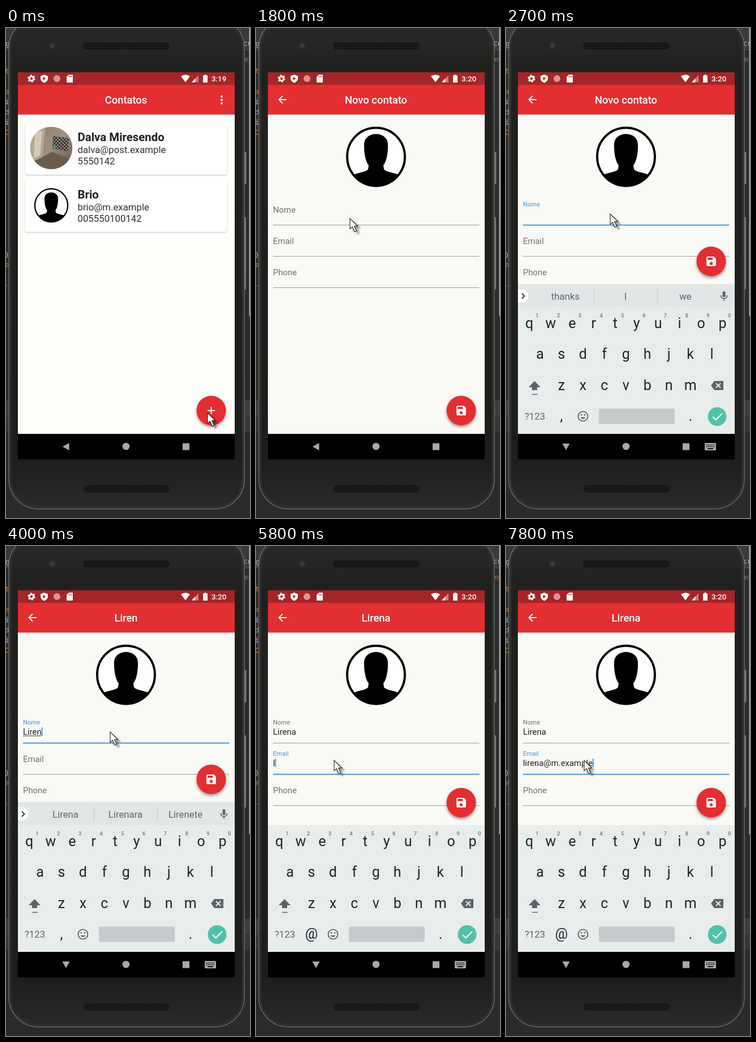
These frames come from a looping animation (431x862 px, 8000 ms). An HTML page:

```html
<!DOCTYPE html>
<html lang="pt">
<head>
<meta charset="utf-8">
<title>Contatos</title>
<style>
html, body { margin: 0; width: 100%; height: 100%; overflow: hidden; background: #2b2b2b; }
svg { display: block; width: 100vw; height: 100vh; font-family: Roboto, sans-serif; }
.title { font-size: 18.4px; font-weight: 500; fill: #fff; text-anchor: middle; }
.code { font: 13px "DejaVu Sans Mono", monospace; fill: #a9b7c6; }
.key { font-size: 25px; fill: #17262d; text-anchor: middle; }
.digit { font-size: 9.5px; font-weight: 500; fill: #6c777c; text-anchor: middle; }
.word { font-size: 16.8px; fill: #5b666b; text-anchor: middle; }
.name { font-size: 20.4px; font-weight: 700; fill: #212121; }
.info { font-size: 16.8px; fill: #303030; }
.entry { font-size: 14.9px; fill: #222; }
</style>
</head>
<body>
<svg viewBox="0 0 431 862" preserveAspectRatio="none">
<defs>
  <linearGradient id="body" x2="0" y2="1">
    <stop offset="0" stop-color="#2b2c29"/><stop offset=".1" stop-color="#20211e"/>
    <stop offset=".9" stop-color="#1d1e1b"/><stop offset="1" stop-color="#2a2b28"/>
  </linearGradient>
  <linearGradient id="room" x2="1" y2="1">
    <stop offset="0" stop-color="#8e8272"/><stop offset=".5" stop-color="#a08f7b"/><stop offset="1" stop-color="#5d5144"/>
  </linearGradient>
  <pattern id="mesh" width="3" height="3" patternUnits="userSpaceOnUse">
    <rect width="3" height="3" fill="#10110f"/><circle cx="1.5" cy="1.5" r=".8" fill="#343532"/>
  </pattern>
  <pattern id="check" width="6" height="6" patternUnits="userSpaceOnUse">
    <rect width="6" height="6" fill="#2d2b2a"/><path d="M0 0h3v6h3v-3h-6z" fill="#8c8983"/>
  </pattern>
  <filter id="soft" x="-50%" y="-50%" width="200%" height="200%">
    <feDropShadow dx="0" dy="3" stdDeviation="2.5" flood-opacity=".4"/>
  </filter>
  <filter id="edge" x="-5%" y="-10%" width="110%" height="125%">
    <feDropShadow dx="0" dy="1" stdDeviation="1" flood-opacity=".28"/>
  </filter>
  <filter id="tipShade" x="-50%" y="-50%" width="250%" height="250%">
    <feDropShadow dx="5" dy="4" stdDeviation="1.4" flood-opacity=".35"/>
  </filter>
  <clipPath id="photo"><circle cx="80" cy="211" r="37.3"/></clipPath>
  <clipPath id="screen"><rect x="21" y="78" width="383" height="636"/></clipPath>
  <g id="person">
    <circle r="51" fill="#fff" stroke="#000" stroke-width="4"/>
    <path d="M-21-18C-22-33-12-40 0-40S22-33 21-18C21-4 18 9 13 15L14 22C19 28 36 28 41 33A52 52 0 0 1-41 33C-36 28-19 28-14 22L-13 15C-18 9-21-4-21-18z"/>
  </g>
</defs>

<!-- editor window behind the phone -->
<g class="code">
  <rect width="431" height="862" fill="#2b2b2b"/>
  <rect width="431" height="38" fill="#37393a"/>
  <rect x="360" y="-12" width="55" height="20" rx="3" fill="#303233" stroke="#5b5d5e"/>
  <path d="M0 38.500H431M0 453.500H8" stroke="#555"/>
  <rect y="655" width="431" height="28" fill="#3c3f41"/>
  <rect y="683" width="431" height="27" fill="#343638"/>
  <text x="-1" y="32">g</text><text x="419" y="31">co</text>
  <text x="421" y="59" fill="#c75450">e</text>
  <g id="scraps"></g>
  <rect x="429.500" width="1.500" height="507"/>
</g>

<!-- phone -->
<rect x="419" y="218" width="5.500" height="57" rx="1" fill="#777875"/>
<rect x="419" y="333" width="5" height="127" rx="1" fill="#777875"/>
<rect x="5" y="-18" width="416" height="864" rx="52" fill="url(#body)" stroke="#6a6b68" stroke-width="1.500"/>
<rect x="8" y="-15" width="410" height="858" rx="49" fill="none" stroke="#30312e" stroke-width="3"/>
<circle cx="82" cy="31" r="8" fill="#292a28"/><circle cx="82" cy="31" r="4" fill="#3a3b3a"/>
<rect x="136" y="25" width="153" height="13" rx="6" fill="url(#mesh)"/>
<rect x="137" y="804" width="152" height="13" rx="6" fill="url(#mesh)"/>

<g clip-path="url(#screen)">
  <rect x="21" y="78" width="383" height="636" fill="#fefffb"/>
  <g id="list">
    <rect x="34" y="166" width="356.500" height="92" rx="3" fill="#fff" filter="url(#edge)"/>
    <rect x="34" y="267" width="356.500" height="91.500" rx="3" fill="#fff" filter="url(#edge)"/>
    <g clip-path="url(#photo)">
      <rect x="42" y="173" width="76" height="76" fill="url(#room)"/>
      <path d="M42 173H70L62 249H42z" fill="#b3a792"/>
      <path d="M51 183L64 181 60 224 49 229z" fill="#d1cabb"/>
      <path d="M42 238L82 218 118 233V249H42z" fill="#6b5b4c"/>
      <path d="M83 190L111 194 109 217 82 212z" fill="url(#check)"/>
      <circle cx="86" cy="210" r="2.500" fill="#36a64a"/>
    </g>
    <use href="#person" transform="translate(80 312) scale(.57)"/>
    <text class="name" x="126.500" y="198.500">Dalva Miresendo</text>
    <text class="info" x="126.500" y="220">dalva@post.example</text>
    <text class="info" x="126.500" y="240">5550142</text>
    <text class="name" x="126.500" y="299.500">Brio</text>
    <text class="info" x="126.500" y="320.500">brio@m.example</text>
    <text class="info" x="126.500" y="340.500">005550100142</text>
  </g>
  <g id="form">
    <rect x="21" y="152" width="383" height="600" fill="#f9faf5"/>
    <use href="#person" x="212" y="226.500"/>
    <g id="fields"></g>
  </g>

  <rect x="21" y="100" width="383" height="52" fill="#e32e33" filter="url(#edge)"/>
  <rect x="21" y="78" width="383" height="22" fill="#a52528"/>
  <text id="title" class="title" x="212" y="133"></text>
  <g id="menu" fill="#fff"><circle cx="381" cy="120.500" r="1.900"/><circle cx="381" cy="126.500" r="1.900"/><circle cx="381" cy="132.500" r="1.900"/></g>
  <path id="back" d="M54 126H40.500M47 119.500L40.500 126 47 132.500" fill="none" stroke="#fff" stroke-width="1.900"/>

  <!-- status icons -->
  <g fill="#fff">
    <circle cx="45" cy="89" r="3.700" fill="none" stroke="#fff" stroke-width="3"/>
    <circle cx="45" cy="89" r="5.800" fill="none" stroke="#fff" stroke-width="2" stroke-dasharray="3 3.070"/>
    <path d="M67.500 82L74 84.500V89Q74 94 67.500 96.500 61 94 61 89V84.500z"/>
    <path d="M65.500 86L70.500 89 65.500 92z" fill="#a52528"/>
    <circle cx="90" cy="89" r="6" fill="#d89493"/>
    <path d="M111 82h6q1 0 1 1v12q0 1-1 1h-9q-1 0-1-1v-9z"/>
    <path d="M111 84v3M113.500 84v3M116 84v3" stroke="#a52528"/>
    <path d="M309 85Q317 79.500 325 85L317 95.500z"/>
    <path d="M328 95.500L340 83V95.500z" opacity=".4"/><path d="M328 95.500L334.500 88.700V95.500z"/>
    <path d="M348 83.500h2.500V82h3v1.500H356V96h-8z"/>
    <text id="clock" x="363" y="94" font-size="13.300" font-weight="500"></text>
  </g>

  <g id="fab">
    <circle r="26" fill="#e32e33" filter="url(#soft)"/>
    <path id="plus" d="M-6.500 0H6.500M0-6.500V6.500" stroke="#fff" stroke-width="1.900"/>
    <path id="save" fill="#fff" transform="scale(.932) translate(-12 -12)" d="M17 3H5c-1.110 0-2 .9-2 2v14c0 1.100.89 2 2 2h14c1.100 0 2-.9 2-2V7l-4-4zm-5 16c-1.660 0-3-1.340-3-3s1.340-3 3-3 3 1.340 3 3-1.340 3-3 3zm3-10H5V5h10v4z"/>
  </g>

  <g id="keyboard">
    <g id="strip">
      <rect x="21" y="450.500" width="383" height="42" fill="#e1e6e6"/>
      <path d="M155.500 460V483M267.500 460V483" stroke="#c3c9cb"/>
      <path d="M21 460H28A11.500 11.500 0 0 1 28 483H21z" fill="#fff"/>
      <path d="M28 467L32.500 471.500 28 476" fill="none" stroke="#333" stroke-width="1.800"/>
      <rect x="382.500" y="463" width="5" height="10.500" rx="2.500" fill="#5b666b"/>
      <path d="M379.500 470Q379.500 476 385 476T390.500 470M385 476V480" fill="none" stroke="#5b666b" stroke-width="1.600"/>
      <g id="words"></g>
    </g>
    <rect x="21" y="491" width="383" height="223" fill="#e8edec"/>
    <g id="keys"></g>
    <path d="M50.500 621L61 632H55V637H46V632H40z" fill="#59656a"/><path d="M46 644.500H56" stroke="#59656a" stroke-width="1.500"/>
    <path d="M362 629L368 621H384V637H368z" fill="#59656a"/>
    <path d="M371 625L379 633M379 625L371 633" stroke="#e8edec" stroke-width="1.900"/>
    <circle cx="136" cy="683" r="8.500" fill="none" stroke="#4d595e" stroke-width="1.700"/>
    <circle cx="133" cy="680.500" r="1.300" fill="#4d595e"/><circle cx="139" cy="680.500" r="1.300" fill="#4d595e"/>
    <path d="M131.500 685Q136 690.500 140.500 685z" fill="#4d595e"/>
    <rect x="164" y="669.500" width="134" height="27" rx="2" fill="#c5cbcd"/>
    <circle cx="373" cy="683.500" r="16.500" fill="#53c1aa"/>
    <path d="M365 684L370.500 689.500 382 678" fill="none" stroke="#fff" stroke-width="2"/>
  </g>
</g>

<!-- navigation bar -->
<rect x="21" y="714" width="383" height="45"/>
<g fill="#a9a9a9">
  <path id="goBack" d="M100 736.500L111.500 730V743z"/>
  <path id="hide" d="M99.500 731H112.500L106 742.500z"/>
  <circle cx="212" cy="736" r="6.300"/><rect x="312" y="730.500" width="12" height="12"/>
  <g id="switcher">
    <rect x="351" y="730" width="20" height="13" rx="1.500"/>
    <path d="M353.500 733.500H369M353.500 736.500H369" stroke="#000" stroke-width="1.700" stroke-dasharray="1.800 1.200"/>
    <path d="M356 740H366" stroke="#000" stroke-width="1.700"/>
  </g>
</g>
<path id="pointer" d="M0 0V18.500L4.300 14.700 8.300 23.500 11.500 22 7.700 13.500H13.500z" fill="#fff" stroke="#222" stroke-width="1.100" filter="url(#tipShade)"/>
</svg>

<script>
const LOOP = 8000, STEP = 100, BLUE = "#3f95df", GREY = "#70716e";
const NAME = "Lirena", EMAIL = "lirena@m.example";
const $ = id => document.getElementById(id);

function add(parent, tag, attrs, text = "") {
  const el = document.createElementNS("http://www.w3.org/2000/svg", tag);
  set(el, attrs);
  el.textContent = text;
  return parent.appendChild(el);
}
function set(el, attrs) {
  for (const k in attrs) el.setAttribute(k, attrs[k]);
}
const show = (el, on) => set(el, { visibility: on ? "visible" : "hidden" });

// Value of the latest [time, ...value] entry that has begun.
function latest(track, t) {
  let value = track[0].slice(1);
  for (const [start, ...rest] of track) if (t >= start) value = rest;
  return value;
}
const ramp = (t, from, to) => Math.min(1, Math.max(0, (t - from) / (to - from)));

// Editor letters peeping out on the left
[..."taidiC"].forEach((c, i) =>
  add($("scraps"), "text", { x: -2, y: [80, 116, 134, 152, 170, 188][i], fill: "taC".includes(c) ? "#cc7832" : "#a9b7c6" }, c));
add($("scraps"), "text", { x: -2, y: 404 }, ")");
add($("scraps"), "text", { x: -2, y: 423, fill: "#cc7832" }, "P");

// Keys
const key = (x, y, c, cls = "key") => add($("keys"), "text", { x, y, class: cls }, c);
[["qwertyuiop", 41, 527.5], ["asdfghjkl", 60, 582], ["zxcvbnm", 98, 637]].forEach(([row, x, y]) =>
  [...row].forEach((c, i) => key(x + i * 37.95, y, c)));
[..."1234567890"].forEach((c, i) => key(55 + i * 37.75, 508.5, c, "digit"));
key(51, 689, "?123", "word");
key(326, 691, ".");
const symbol = key(98, 691, ",");
const words = [105, 211, 317].map(x => add($("words"), "text", { x, y: 478, class: "word" }));

// Form fields
const fields = ["Nome", "Email", "Phone"].map((label, i) => {
  const g = add($("fields"), "g", { transform: `translate(30 ${i * 55})` });
  return {
    label: add(g, "text", {}, label),
    line: add(g, "rect", { width: 364.5 }),
    entry: add(g, "text", { class: "entry", y: 332 }),
    composing: add(g, "rect", { y: 333.5, height: 1, fill: "#333" }),
    caret: add(g, "rect", { y: 319, width: 1.8, height: 15, fill: BLUE })
  };
});
function drawField(f, { text = "", lift = 0, focus = false, lined = false, caret = false, composing = false }) {
  set(f.label, { y: 324.5 - 10.5 * lift, "font-size": 14.9 - 3.7 * lift, fill: focus ? BLUE : GREY });
  set(f.line, lined ? { y: 345.7, height: 1.9, fill: BLUE } : { y: 346.2, height: 1, fill: "#969793" });
  f.entry.textContent = text;
  const width = text ? f.entry.getComputedTextLength() : 0;
  set(f.caret, { x: width });
  set(f.composing, { width: composing ? width : 0 });
  show(f.caret, caret);
}

const pointerTrack = [
  [0, 356, 677], [300, 359, 675], [500, 363, 673], [700, 356, 676], [1000, 356, 657], [1300, 311, 583],
  [1500, 212, 381], [1700, 170, 345], [1800, 166, 335], [2100, 164, 333], [2600, 176, 330], [2700, 184, 327],
  [4500, 168, 330], [4700, 152, 352], [4800, 142, 370], [4900, 138, 377]
];
const nameTrack = [[0, 0], [3200, 1], [3400, 2], [3500, 3], [4000, 5], [4500, 6]];
const emailTrack = [
  [0, 0], [5800, 1], [5900, 3], [6100, 5], [6200, 6], [6500, 7], [6900, 8], [7000, 9], [7100, 10],
  [7200, 11], [7400, 12], [7500, 13], [7700, 15], [7800, 16]
];
const wordTrack = [
  [0, "thanks", "I", "we"], [3200, "Let", "Like", "Love"], [3500, "Lira", "Lirio", "Lied"],
  [3700, "Lirio", "Lira", "Liras"], [4000, "Lirena", "Lirenara", "Lirenete"]
];
const fabTrack = [[0, 673], [2600, 410.5], [5100, 451.5]];

function draw(t) {
  const [x, y] = latest(pointerTrack, t);
  set($("pointer"), { transform: `translate(${x} ${y})` });

  // The form fades in while rising a little.
  const onForm = t >= 1000, enter = onForm ? .6 + .4 * ramp(t, 1000, 1100) : 0;
  set($("form"), { opacity: enter, transform: `translate(0 ${(1 - enter) * 40})` });
  show($("list"), enter < 1);
  show($("menu"), !onForm);
  show($("back"), onForm);
  show($("plus"), !onForm);
  show($("save"), onForm);

  const name = NAME.slice(0, latest(nameTrack, t)[0]);
  const email = EMAIL.slice(0, latest(emailTrack, t)[0]);
  const onEmail = t >= 5100;
  $("title").textContent = onForm ? name || "Novo contato" : "Contatos";
  $("clock").textContent = t < 1700 ? "3:19" : "3:20";

  drawField(fields[0], {
    text: name, lift: ramp(t, 2000, 2300), focus: t >= 2100 && !onEmail,
    lined: t >= 2200 && t < 5400, composing: !onEmail,
    caret: (t >= 2300 && t < 2600) || (t >= 3200 && t < 4700)
  });
  drawField(fields[1], {
    text: email, lift: ramp(t, 5000, 5200), focus: onEmail, lined: t >= 5400, caret: t >= 5400
  });
  drawField(fields[2], {});

  const typing = t >= 2300;
  show($("goBack"), !typing);
  show($("hide"), typing);
  show($("switcher"), typing);
  set($("keyboard"), { transform: `translate(0 ${270 * (1 - ramp(t, 2400, 2700)) ** 2})` });
  show($("strip"), !onEmail);
  symbol.textContent = onEmail ? "@" : ",";
  latest(wordTrack, t).forEach((w, i) => words[i].textContent = w);
  set($("fab"), { transform: `translate(362.5 ${latest(fabTrack, t)[0]})` });
}

function frame() {
  draw(Math.floor(performance.now() % LOOP / STEP) * STEP);
  requestAnimationFrame(frame);
}
frame();
</script>
</body>
</html>
```
